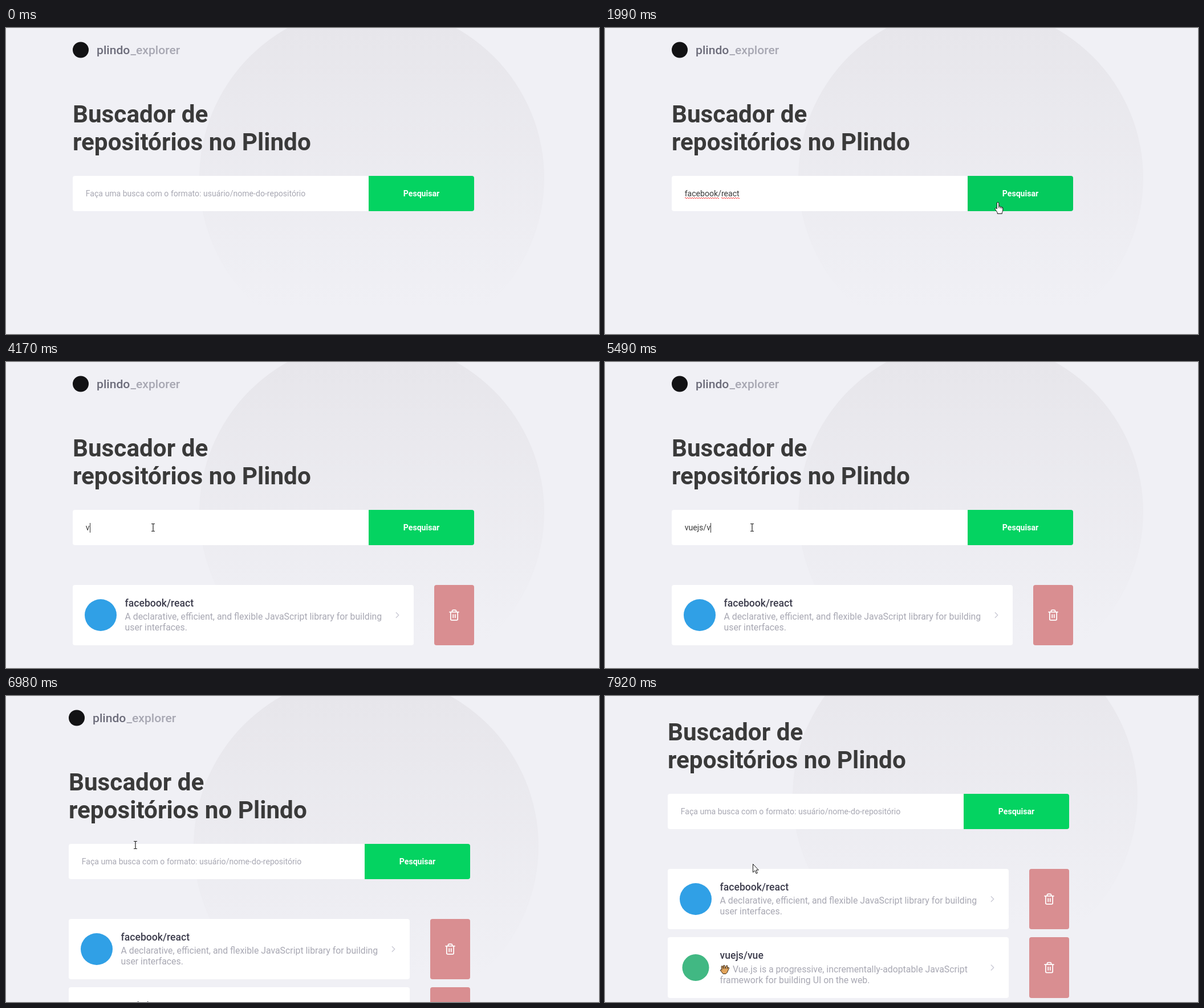
These frames come from a looping animation (1040x538 px, 7.99 s). An HTML page:

```html
<!DOCTYPE html>
<html lang="pt-BR">
<head>
<meta charset="utf-8">
<title>Buscador de repositórios</title>
<style>
  html, body { margin: 0; width: 100%; height: 100%; overflow: hidden; background: #f0f0f5; }
  svg { display: block; width: 1040px; height: 538px; font-family: Roboto, sans-serif; }
  text { white-space: pre; }
  .logo { font-size: 21.12px; font-weight: 500; }
  .title { font-size: 42.24px; font-weight: 700; fill: #3a3a3a; }
  .field { font-size: 14.08px; }
  .name { font-size: 17.6px; font-weight: 500; fill: #3d3d4d; }
  .about { font-size: 15.84px; }
  .soft { fill: #a8a8b3; }
  .line { fill: none; stroke-width: 2; stroke-linecap: round; stroke-linejoin: round; }
</style>
</head>
<body>
<svg viewBox="0 0 1040 538">
  <defs>
    <linearGradient id="fade" gradientUnits="userSpaceOnUse" x1="0" y1="0" x2="0" y2="490">
      <stop offset="0" stop-color="#e7e6eb"/>
      <stop offset="1" stop-color="#f0f0f5"/>
    </linearGradient>
    <path id="trash" class="line" stroke="#fff" transform="scale(.88) translate(-12 -12)"
      d="M3 6h18M19 6v14a2 2 0 0 1-2 2H7a2 2 0 0 1-2-2V6m3 0V4a2 2 0 0 1 2-2h4a2 2 0 0 1 2 2v2M10 11v6M14 11v6"/>
    <path id="chevron" class="line" stroke="#cbcbd6" transform="scale(.733)" d="M-3 6L3 0L-3-6"/>
  </defs>

  <circle id="backdrop" cx="641.5" cy="264" r="302.5" fill="url(#fade)"/>

  <g id="page">
    <circle cx="131" cy="38.5" r="14" fill="#121214"/>
    <text class="logo" x="159" y="46" fill="#6c6c7a">plindo</text>
    <text class="logo soft" x="218.5" y="46">_explorer</text>
    <text class="title" x="117" y="166">Buscador de</text>
    <text class="title" x="117" y="215">repositórios no Plindo</text>

    <path fill="#fff" d="M636 260H121a4 4 0 0 0-4 4v54a4 4 0 0 0 4 4H636z"/>
    <path id="button" d="M636 260H817a4 4 0 0 1 4 4v54a4 4 0 0 1-4 4H636z"/>
    <text class="field" x="728.5" y="296" text-anchor="middle" font-weight="700" fill="#fff">Pesquisar</text>
    <text id="hint" class="field soft" x="139.7" y="296">Faça uma busca com o formato: usuário/nome-do-repositório</text>
    <text id="typed" class="field" x="139.7" y="296" fill="#3a3a3a"></text>
    <path id="squiggle" fill="none" stroke="#f33"/>
    <rect id="caret" y="283" width="1" height="17" fill="#333"/>
    <g id="card1"></g>
    <g id="card2"></g>
  </g>

  <g id="cursor">
    <path id="arrow" fill="#fff" stroke="#111" d="M.5.5V15L3.8 11.9L6.2 17.2L8.3 16.2L6 11H10.3Z"/>
    <path id="beam" fill="none" stroke="#222" stroke-width="1.2" d="M-3-6.500H3M0-6.500V6.500M-3 6.500H3"/>
    <path id="hand" fill="#fff" stroke="#111" stroke-linejoin="round"
      d="M-1.700 2Q-1.700.5 0 .5T1.700 2V7.500Q3.500 6.500 4.300 8.200Q6 7.300 6.700 9.200Q8.800 8.500 8.800 11V14Q8.800 16.500 7.300 18.500V20.500H-.8V18.500L-4.800 12.500Q-5 11-4.600 11Q-3.500 9.800-1.700 12ZM1.700 7.500V10.500M4.300 8.500V11M6.700 9.500V11.500"/>
  </g>
</svg>
<script>
const LOOP = 7990, TICK = 77.7;
const FIRST_RESULT = 2690, SECOND_RESULT = 6830;
const $ = id => document.getElementById(id);
const show = (id, on) => $(id).setAttribute('visibility', on ? 'inherit' : 'hidden');
const within = (t, a, b) => t >= a && t < b;
const progress = (t, a, b) => Math.min(1, Math.max(0, (t - a) / (b - a)));

const linear = u => u;
const easeIn = u => u * u;
const easeOut = u => u * (2 - u);
const smooth = u => u * u * (3 - 2 * u);

// Pointer moves from one place to the next; sag bends the way downwards
const START = { x: 814, y: 520 };
const moves = [
  { from: 140, to: 840, x: 258, y: 291, ease: easeOut, sag: 45 },
  { from: 1450, to: 2000, x: 689, y: 306, ease: linear },
  { from: 2010, to: 2160, x: 694, y: 317, ease: linear },
  { from: 2262, to: 3070, x: 258, y: 291, ease: easeOut },
  { from: 5881, to: 6340, x: 680, y: 297, ease: linear },
  { from: 6360, to: 6520, x: 700, y: 300, ease: easeOut },
  { from: 6590, to: 6990, x: 226, y: 261, ease: smooth, sag: 50 },
  { from: 7070, to: 7350, x: 246, y: 276, ease: smooth },
  { from: 7760, to: 7900, x: 259, y: 295, ease: smooth }
];

// Bursts of typing, with the pause between keys
const typing = [
  { text: 'vue', start: 4170, gap: 80 },
  { text: 'js', start: 4480, gap: 170 },
  { text: '/', start: 4940, gap: 0 },
  { text: 'vue', start: 5420, gap: 80 }
];
const keys = typing.flatMap(({ text, start, gap }) =>
  [...text].map((char, i) => ({ char, time: start + i * gap })));

const FOCUS_1 = 920, PASTE = 1300, SUBMIT_1 = 2143, FOCUS_2 = 3450, SUBMIT_2 = 6520;
const inputTimes = [FOCUS_1, PASTE, FOCUS_2, ...keys.map(k => k.time)];

const held = t => 140 + TICK * Math.floor((t - 140) / TICK + .3);

function pointer(t) {
  let { x, y } = START;
  for (const m of moves) {
    if (t < m.from) break;
    const u = m.ease(progress(t, m.from, m.to));
    x += (m.x - x) * u;
    y += (m.y - y) * u + (m.sag || 0) * Math.sin(Math.PI * u);
  }
  return { x, y };
}

function pointerKind({ x, y }, dx, dy) {
  const px = x - dx, py = y - dy;
  if (!within(px, 117, 821) || !within(py, 260, 322)) return 'arrow';
  return px < 636 ? 'beam' : 'hand';
}

function inputValue(t) {
  if (t < PASTE || t >= SECOND_RESULT) return '';
  if (t < FIRST_RESULT) return 'facebook/react';
  return keys.filter(k => k.time <= t).map(k => k.char).join('');
}

function caretOn(t) {
  const focused = within(t, FOCUS_1, SUBMIT_1) || within(t, FOCUS_2, SUBMIT_2);
  const last = Math.max(...inputTimes.filter(time => time <= t));
  return focused && (t - last) % 960 < 480;
}

const hover = (t, enter, leave) =>
  smooth(progress(t, enter, enter + 200)) - smooth(progress(t, leave, leave + 200));

function wave(from, to) {
  let d = `M${from} 299`;
  for (let x = from; x < to; x += 4) d += 'q1-2 2 0t2 0';
  return d;
}

function card(id, { y, h, name, lines, color, radius, indent = 0, extra = '' }) {
  const mid = y + h / 2, base = y + h - 45;
  $(id).innerHTML = `
    <rect x="117" y="${y}" width="598" height="${h}" rx="4" fill="#fff"/>
    <circle cx="166" cy="${mid}" r="${radius}" fill="${color}"/>
    <text class="name" x="208.5" y="${y + 37.8}">${name}</text>
    ${extra}
    <text class="about soft" x="${208.5 + indent}" y="${base}">${lines[0]}</text>
    <text class="about soft" x="208.5" y="${base + 19.4}">${lines[1]}</text>
    <use href="#chevron" x="686.5" y="${mid}"/>
    <rect x="751" y="${y}" width="70" height="${h}" rx="4" fill="#d98e91"/>
    <use href="#trash" x="786" y="${mid}"/>`;
}

function draw(t) {
  const now = held(t);
  const narrow = t >= SECOND_RESULT;
  const dx = narrow ? -7 : 0;
  const dy = -Math.round(88 * easeIn(progress(now, 7610, 7910)));
  $('page').setAttribute('transform', `translate(${dx} ${dy})`);
  $('backdrop').setAttribute('transform', `translate(${narrow ? -10 : 0} ${dy})`);

  const value = inputValue(t);
  if ($('typed').textContent !== value) $('typed').textContent = value;
  show('hint', !value);
  show('squiggle', within(t, 1450, SUBMIT_1));
  show('caret', caretOn(t));
  $('caret').setAttribute('x', value ? Math.round(139.7 + $('typed').getComputedTextLength()) : 140);

  const dark = hover(now, 1946, 2364) + hover(now, 6233, 6640);
  const mix = (a, b) => Math.round(a + (b - a) * dark);
  $('button').setAttribute('fill', `rgb(${mix(4, 3)},${mix(211, 169)},${mix(97, 78)})`);

  show('card1', t >= FIRST_RESULT);
  show('card2', narrow);

  const place = pointer(now);
  const kind = pointerKind(place, dx, dy);
  $('cursor').setAttribute('transform', `translate(${Math.round(place.x)} ${Math.round(place.y)})`);
  for (const id of ['arrow', 'beam', 'hand']) show(id, t >= 140 && id === kind);
}

card('card1', {
  y: 392, h: 106, name: 'facebook/react', color: '#30a0e6', radius: 28,
  lines: ['A declarative, efficient, and flexible JavaScript library for building', 'user interfaces.']
});
card('card2', {
  y: 512, h: 107, name: 'vuejs/vue', color: '#41b883', radius: 23.5, indent: 22.5,
  lines: ['Vue.js is a progressive, incrementally-adoptable JavaScript', 'framework for building UI on the web.'],
  extra: `<path transform="translate(209 560.5)" fill="#e3a55c" stroke="#35291d" stroke-linejoin="round"
    d="M5 16L0 9.500Q1 8 3 9L2 3Q3 1 4.500 3L5.500 7V1.500Q7 0 8 1.500L8.500 7L11 1.500Q12.500.5 13 2.500L12 7L14 4.500Q16 4.500 15.500 6.500L12 14L10 16Z"/>`
});
$('squiggle').setAttribute('d', wave(140, 197) + wave(204, 236));

const begin = performance.now();
function loop() {
  draw((performance.now() - begin) % LOOP);
  requestAnimationFrame(loop);
}
loop();
</script>
</body>
</html>
```
